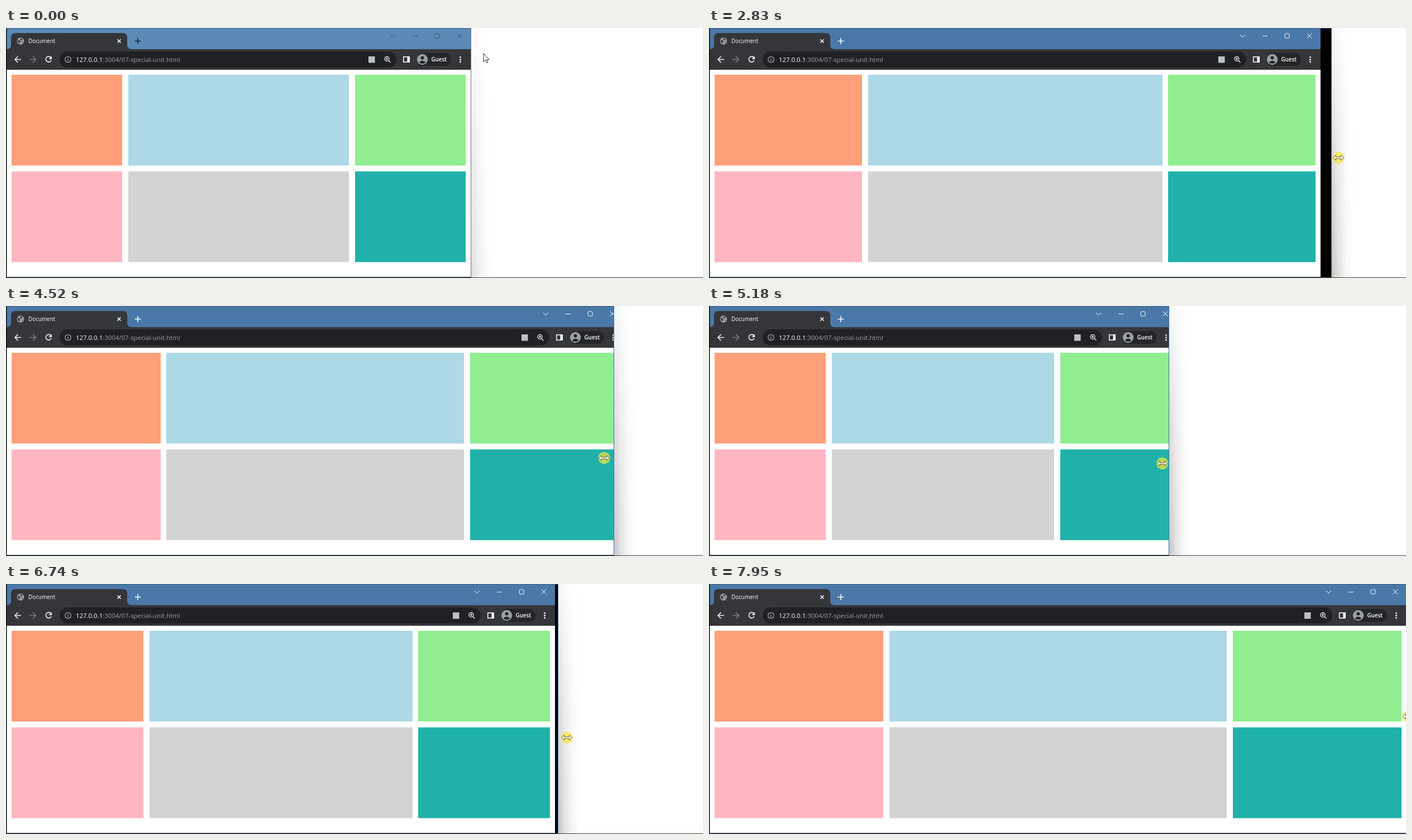
An HTML page that plays this animation: 1248 px wide and 449 px high, repeating every 8 s.

```html
<!DOCTYPE html>
<html lang="en">
<head>
<meta charset="utf-8">
<title>Resizing a grid</title>
<style>
  html, body { margin: 0; width: 100%; height: 100%; overflow: hidden; background: #fff; }
  svg { display: block; width: 100%; height: 100%; }
  text { font-family: "Open Sans", "Noto Sans", sans-serif; fill: #fff; }
  .line { fill: none; stroke: #f1f3f4; stroke-width: 1.7; }
  .thin { fill: none; stroke: var(--ctl); stroke-width: 1; }
</style>
</head>
<body>
<svg viewBox="0 0 1248 449" preserveAspectRatio="none">
  <defs>
    <linearGradient id="fade">
      <stop offset="0" stop-color="#000" stop-opacity=".24"/>
      <stop offset=".3" stop-color="#000" stop-opacity=".12"/>
      <stop offset=".65" stop-color="#000" stop-opacity=".03"/>
      <stop offset="1" stop-color="#000" stop-opacity="0"/>
    </linearGradient>
    <linearGradient id="drop" x2="0" y2="1">
      <stop offset="0" stop-color="#fff" stop-opacity=".12"/>
      <stop offset=".5" stop-color="#fff" stop-opacity=".6"/>
      <stop offset="1" stop-color="#fff" stop-opacity=".95"/>
    </linearGradient>
    <mask id="dropMask" maskUnits="userSpaceOnUse" x="0" y="0" width="40" height="448">
      <rect width="40" height="448" fill="url(#drop)"/>
    </mask>
    <clipPath id="frame"><rect id="frameClip" height="448"/></clipPath>
  </defs>

  <rect width="1248" height="449" fill="#fff"/>
  <g id="shadow"><rect width="40" height="448" fill="url(#fade)" mask="url(#dropMask)"/></g>

  <g clip-path="url(#frame)">
    <rect width="1400" height="448" fill="#000"/>
    <rect id="page" y="75" height="372" fill="#fff"/>
    <rect id="title" height="38"/>
    <rect id="bar" y="38" height="37" fill="#35363a"/>
    <path d="M1 38Q9 38 9 30V17Q9 9 17 9H209Q217 9 217 17V30Q217 38 225 38Z" fill="#35363a"/>
    <g id="grid"></g>

    <circle cx="26" cy="23.500" r="6.200" fill="#a6a9ad"/>
    <path d="M21 21l4 1 1 3-2 3-3-3zM26 18l4 2-2 3-3-2zM28 25l3-1-2 4z" fill="#45464a"/>
    <text x="40" y="27" font-size="9.900">Document</text>
    <path class="line" stroke-width="1.400" d="M199.500 20.500l6 6m0-6l-6 6"/>
    <path id="plus" class="thin" style="stroke-width:1.600" d="M230.500 23.500h11m-5.500-5.500v11"/>

    <path class="line" d="M27 56.500H16m5.500-5.500L16 56.500l5.500 5.500"/>
    <path class="line" style="stroke:#7b7c80" d="M42 56.500H53.500m-5.500-5.500l5.500 5.500-5.500 5.500"/>
    <path class="line" d="M80.300 53A5 5 0 1 0 81 58"/>
    <path d="M82 50.500v5.500h-5.500z" fill="#f1f3f4"/>

    <rect id="address" x="96" y="42" height="29" rx="14.500" fill="#202124"/>
    <circle class="line" style="stroke:#b5b8bc;stroke-width:1.100" cx="111" cy="56.500" r="5.300"/>
    <path class="line" style="stroke:#b5b8bc;stroke-width:1.200" d="M111 55.500v4M111 53v1.300"/>
    <text x="125" y="60.500" font-size="11.400">127.0.0.1<tspan fill="#9aa0a6">:3004/07-special-unit.html</tspan></text>

    <g id="right">
      <path class="thin" d="M-144 12l4.500 4.500 4.500-4.500M-104 14.500h9M-24.500 9.500l9 9m0-9l-9 9"/>
      <rect class="thin" x="-64" y="10" width="8" height="8" rx="1.500"/>
      <rect x="-183" y="51" width="11.500" height="11.500" fill="#bdc1c6"/>
      <circle class="line" style="stroke-width:1.300" cx="-150" cy="55.500" r="4"/>
      <path class="line" style="stroke-width:1.300" d="M-147 58.500l3.500 3.500M-152 55.500h4m-2-2v4"/>
      <path d="M-121 51h12v11h-12zM-119.500 52.500v8h6v-8z" fill="#fff" fill-rule="evenodd"/>
      <rect x="-97" y="45" width="62" height="23" rx="11.500" fill="#242528"/>
      <circle cx="-86.500" cy="56.500" r="9.700" fill="#9aa0a6"/>
      <circle cx="-86.500" cy="53.500" r="3" fill="#202124"/>
      <path d="M-92.500 62Q-86.500 55.500-80.500 62Q-86.500 66-92.500 62Z" fill="#202124"/>
      <text x="-70.500" y="60" font-size="9.800" font-weight="600">Guest</text>
      <path d="M-19.800 51h2.600v2.600h-2.600zM-19.800 55.300h2.600v2.600h-2.600zM-19.800 59.600h2.600v2.600h-2.600z" fill="#f1f3f4"/>
    </g>
    <path d="M0 .5H1400" stroke="#3c5f82"/>
    <path d="M.75 0V448" stroke="#111" stroke-width="1.500"/>
    <path d="M0 447.500H1400" stroke="#26384a"/>
  </g>
  <path id="edge" d="M.5 0V448"/>
  <path d="M0 448.500H1248" stroke="#333"/>

  <path id="arrow" d="M0 0V14.500l3.300-3 2.300 5 2.200-1-2.200-4.800h4.600z" fill="#fff" stroke="#222"/>
  <g id="resize">
    <circle id="press" r="10.700" fill="#f5e642" fill-opacity=".72"/>
    <path d="M-9.500 0l5-4.500v3h9v-3l5 4.500-5 4.500v-3h-9v3z" fill="#fff" fill-opacity=".75" stroke="#55533a" stroke-width=".9"/>
  </g>
</svg>
<script>
const LOOP = 8000, STEP = 65, PHASE = 35, PRESS = 1390;
// time, frame width, painted width, pointer x, pointer y
const KEYS = [
  [35, 832, 832, 855, 46],
  [620, 832, 832, 844, 165],
  [800, 832, 832, 844, 165],
  [1060, 832, 832, 836, 207],
  [1715, 832, 832, 836, 207],
  [2200, 920, 920, 924, 218],
  [2570, 920, 920, 924, 218],
  [2830, 1114, 1095, 1127, 233],
  [3285, 1197, 1194, 1202, 241],
  [3350, 1197, 1197, 1202, 241],
  [3675, 1264, 1264, 1267, 250],
  [4195, 1264, 1264, 1267, 250],
  [4520, 1088, 1106, 1071, 273],
  [5040, 888, 904, 875, 282],
  [5755, 530, 538, 527, 286],
  [6015, 528, 528, 534, 285],
  [6080, 558, 556, 579, 284],
  [6600, 901, 888, 917, 278],
  [6730, 988, 983, 1004, 276],
  [7380, 1188, 1184, 1193, 250],
  [7510, 1190, 1190, 1195, 249],
  [7900, 1252, 1249, 1252, 238]
];
const ROWS = [
  [84, ["#ffa07a", "#add8e6", "#90ee90"]],
  [257.5, ["#ffb6c1", "#d3d3d3", "#20b2aa"]]
];
const $ = id => document.getElementById(id);
const set = (el, attrs) => { for (const k in attrs) el.setAttribute(k, attrs[k]); };
const move = (id, x, y = 0) => set($(id), { transform: `translate(${x} ${y})` });

const cells = ROWS.flatMap(([y, fills]) => fills.map((fill, col) => {
  const el = document.createElementNS("http://www.w3.org/2000/svg", "rect");
  set(el, { y, height: 163, fill });
  $("grid").append(el);
  return { el, col };
}));

function pose(t) {
  const i = KEYS.findIndex(k => k[0] > t);
  if (i === 0) return KEYS[0].slice(1);
  if (i < 0) return KEYS[KEYS.length - 1].slice(1);
  const a = KEYS[i - 1], b = KEYS[i], f = (t - a[0]) / (b[0] - a[0]);
  return a.slice(1).map((v, j) => v + (b[j + 1] - v) * f);
}

function layout(width) {
  const left = 10.3, gap = 10.8, fr = (width - 9 - left - 2 * gap) / 4;
  const tracks = [
    [left, fr],
    [left + fr + gap, 2 * fr],
    [left + 3 * fr + 2 * gap, fr]
  ];
  for (const { el, col } of cells) {
    const [x, w] = tracks[col], x0 = Math.round(x);
    set(el, { x: x0, width: Math.round(x + w) - x0 });
  }
}

function draw(t) {
  const tick = PHASE + Math.floor((t - PHASE) / STEP) * STEP;
  const [outer, inner, x, y] = pose(tick);
  const w = Math.round(outer), c = Math.round(inner);
  const active = t >= PRESS, resizing = tick >= 1000;

  set($("frameClip"), { width: w + 1 });
  for (const id of ["page", "title", "bar"]) set($(id), { width: c });
  set($("title"), { fill: active ? "#4a78a8" : "#5c8ab7" });
  set($("address"), { width: c - 229 });
  document.documentElement.style.setProperty("--ctl", active ? "#fff" : "#36516c");
  $("plus").style.stroke = active ? "#fff" : "#16202a";
  move("right", c);
  layout(c);

  move("edge", w);
  set($("edge"), { stroke: active ? "#41709f" : "#777" });
  move("shadow", w + 1);
  set($("shadow"), { opacity: active ? 1 : 0.6 });

  move("arrow", x, y);
  move("resize", x, y);
  set($("arrow"), { visibility: resizing ? "hidden" : "visible" });
  set($("resize"), { visibility: resizing ? "visible" : "hidden" });
  set($("press"), { "fill-opacity": active ? 0.72 : 0 });
}

const start = performance.now();
function loop() {
  draw((performance.now() - start) % LOOP);
  requestAnimationFrame(loop);
}
loop();
</script>
</body>
</html>
```
